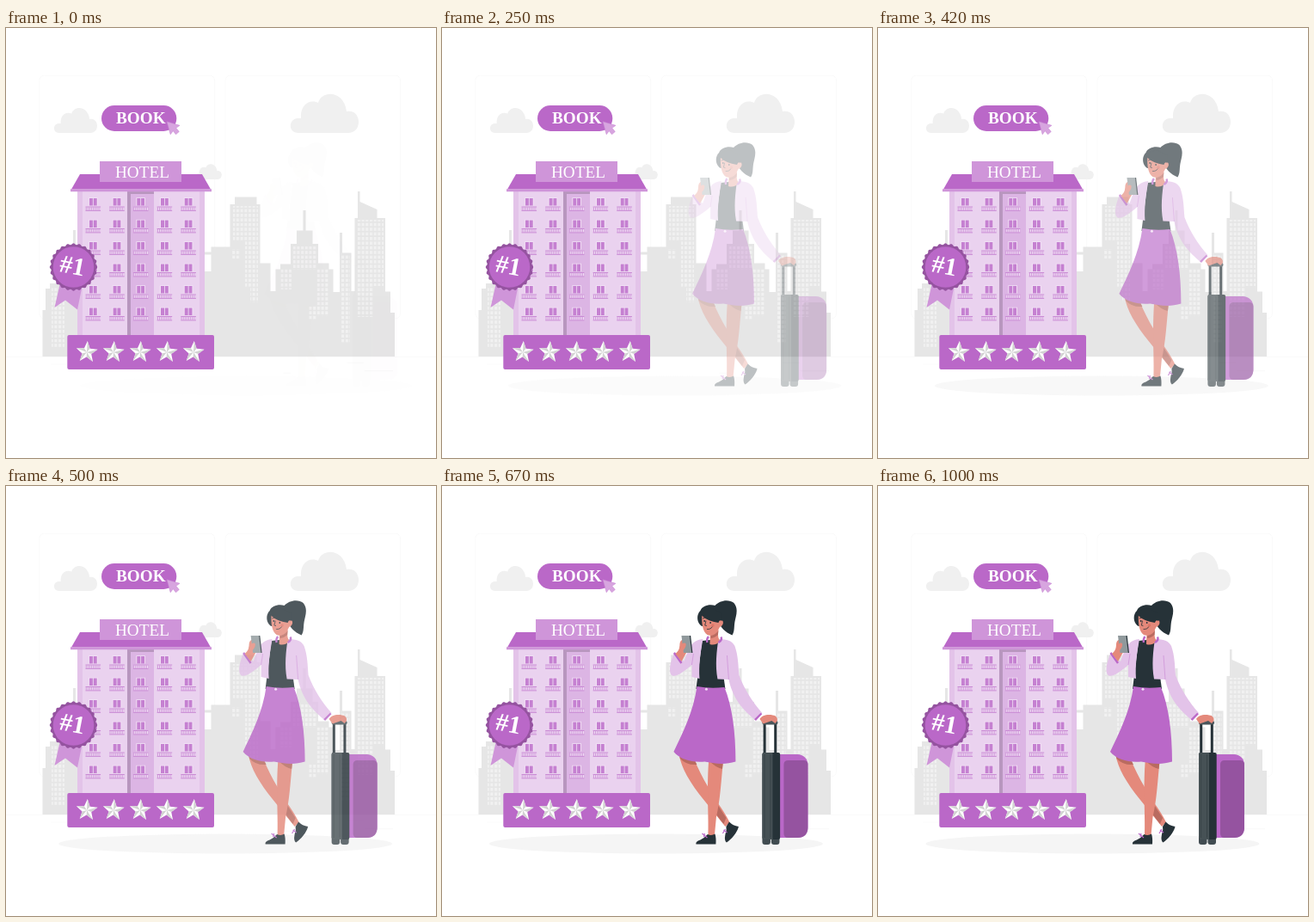
These frames come from a looping animation (500x500 px, 1.04 s). An HTML page:

```html
<!DOCTYPE html>
<html lang="en">
<head>
<meta charset="utf-8">
<title>Hotel booking</title>
<style>
  html, body { margin: 0; width: 100%; height: 100%; overflow: hidden; background: #fff }
  svg { display: block; width: 100vw; height: 100vh }
  text { font-family: "Liberation Serif", serif; fill: #fff }
  .main { fill: #ba68c8 }
  .mid { fill: #cf95d9 }
  .pale { fill: #e3c3e9 }
  .deep { fill: #9553a0 }
  .dark { fill: #263238 }
  .skin { fill: #e4897b }
  .shade { fill: #b96b60 }
  .line { fill: none; stroke: #ba68c8; stroke-width: 2.4 }
  .ink { fill: none; stroke: #263238; stroke-width: .8; stroke-linecap: round }
</style>
</head>
<body>
<svg viewBox="0 0 500 500">
  <defs>
    <path id="cloud" d="M9 46C-3 46-3 30 8 29Q10 29 12 29C11 15 20 6 32 11C36-4 62-4 65 21C74 19 79 26 79 33C79 41 74 46 67 46Z"/>
    <pattern id="dots" width="4.7" height="5.4" patternUnits="userSpaceOnUse">
      <rect width="3" height="3.6" fill="#f1f1f1"/>
    </pattern>
    <g id="window">
      <path fill="#f3e5f6" d="M-5.3-.7H5.3V8.5H-5.3Z"/>
      <path fill="#c580d1" d="M-4.4 0H-.4V8.5H-4.4ZM.4 0H4.4V8.5H.4Z"/>
      <path fill="#f0dff4" d="M-8.5 9.5H8.5V14.5H-8.5Z"/>
      <path fill="none" stroke="#c98ad4" d="M-8.8 10H8.8M-8.8 14.4H8.8"/>
      <path fill="none" stroke="#cf95d9" stroke-width="4" stroke-dasharray="1 1.1" d="M-8.5 12.3H8.6"/>
    </g>
  </defs>

  <g fill="none" stroke="#ebebeb" stroke-width=".25">
    <rect x="38.8" y="55.2" width="203.8" height="282.6" rx="5.7"/>
    <rect x="255" y="55.2" width="203.6" height="282.6" rx="5.7"/>
    <path d="M0 382.5H500M416.8 398.6H450M322.5 401.3H331M396.6 389.3H415.8M52.5 391H95M131 395H225"/>
  </g>
  <g fill="#f0f0f0">
    <use href="#cloud" x="331" y="76"/>
    <use href="#cloud" transform="translate(56 92.5) scale(.633 .64)"/>
    <use href="#cloud" transform="translate(220 158) scale(.39)"/>
  </g>
  <path fill="#e6e6e6" d="M42.500 382V328H46V303H51V297H78V235H81V297H230V283H238.500V263.500H230V260.500H238.500V254.500H260.500V205H266V196.500H291.500V205H295.500V273.500H307.500V306H313.500V280.500H319V274.500H331V251H338V235.500H345.500V212H348.500V235.500H356.500V251H363V273.500H375.500V280.500H380.500V307H388V238H391V261.500H401.500V306H405.500V221H409V190H411.500V202L431.500 211V221H441V306.500H447V331H452V382Z"/>
  <path fill="url(#dots)" d="M53 302H68V372H53ZM264 207H293V247H264ZM278 247H293V302H278ZM263 257H272V268H263ZM284 302H293V319H284ZM334 254H362V281H334ZM319 279H332V304H319ZM361 279H375V335H361ZM352 324H362V340H352ZM390 264H400V367H390ZM408 223H439V300H408ZM408 300H427V336H408Z"/>

  <g id="hotel">
    <path class="pale" d="M83 189H231V358H83Z"/>
    <path fill="#ead2ef" d="M89 190H225V358H89Z"/>
    <path fill="#dcb5e4" d="M141 190H172V358H141Z"/>
    <path fill="#b896be" d="M141 190H172V193H145V358H141Z"/>
    <g id="windows"></g>
    <path class="main" d="M86 170H228L238 187.500H76Z"/>
    <path class="mid" d="M75 187.300H239V190.200H75ZM109 155H204V179H109Z"/>
    <text x="127" y="174" font-size="19.2">HOTEL</text>
    <rect class="main" x="71.300" y="357" width="170.700" height="40" rx="2"/>
    <g id="stars"></g>
  </g>

  <path class="mid" d="M63 296L56.500 325L69 316.500L83 327.500L88 303Z"/>
  <path id="seal" class="deep"/>
  <circle class="main" cx="78.500" cy="278" r="23.800"/>
  <text transform="translate(61 283) rotate(11)" font-size="29.500" font-weight="bold">#1</text>

  <rect class="main" x="111" y="90" width="87.300" height="30" rx="15"/>
  <text x="128" y="110.700" font-size="19.200" font-weight="bold">BOOK</text>
  <path fill="#d7a5df" stroke="#c580d1" stroke-width=".5" d="M187 108.800L202 113.300L197.800 116.300L201.300 120.500L197.500 123.800L194.300 119.700L191.200 123.800Z"/>

  <g id="traveller">
    <ellipse cx="249.500" cy="416" rx="194" ry="11.500" fill="#f5f5f5"/>

    <rect class="main" x="380" y="312" width="46" height="97" rx="12"/>
    <path class="deep" d="M403 319H421Q426 319 426 324V397Q426 409 414 409H403Q398 409 398 404V324Q398 319 403 319Z"/>
    <path fill="none" stroke="#263238" stroke-width="3" d="M375.700 311V276M388.300 311V276"/>
    <rect x="373" y="273" width="18" height="4.500" rx="2" fill="#4a565b"/>
    <rect x="373" y="408" width="9.500" height="9" rx="3" fill="#414c51"/>
    <rect x="383.500" y="408" width="9.500" height="9" rx="3" fill="#414c51"/>
    <rect class="dark" x="373" y="310" width="20.700" height="101" rx="2"/>
    <path fill="#465155" d="M375 310H385V411H375Q373 411 373 409V312Q373 310 375 310Z"/>
    <path fill="none" stroke="#384347" d="M375.500 312V409M382.500 312V409"/>

    <path class="skin" d="M276 311C279 329 289 345 305 365L330 396L335 391C326 373 316 363 310 350C304 340 298 328 293 316Z"/>
    <path class="shade" d="M276 311L293 316L297 324Q285 325 277.500 317ZM320 369L331 386L328 393L318 380Z"/>
    <path class="skin" d="M311 316L327.500 320C325 345 324 366 319.500 385L317.500 406H310C311 385 308 350 311 316Z"/>
    <path class="shade" d="M311 316L327.500 320L326.500 329Q318 327 311 319Z"/>
    <path class="dark" d="M309.500 405Q314 407 318 404.500Q319.500 409 319 416.500H296Q295 413.500 301 411.500Q306 409 309.500 405Z"/>
    <path class="dark" d="M334.500 390.500Q339 395 345.500 396C344 403 337 411 331.500 414.500Q328.500 413 330 405Q332 400 331 396Z"/>
    <path class="line" style="stroke-width:1.200" d="M303 404L309 409M306 404L305 408M328 400L332 403M330 399L327 404"/>

    <path class="dark" d="M303 180L322 178L330 236H296Z"/>
    <path class="main" d="M297 233Q312 236 329 234C338 256 342 286 342 320.500C328 325 315 322 306 320.500C292 322 277 318 270 309C281 286 293 262 297 233Z"/>
    <circle cx="308" cy="236.300" r="1.500" fill="#f0d9f4"/>

    <path class="pale" d="M304 178C294 179 290 184 286 193L282 204L271 193C266 204 264 215 267 219.500C271 224 282 216 291 208L291 222L300 224C299 208 301 194 304 178Z"/>
    <path class="pale" d="M322 178C332 178 338 180 341 186C345 197 345 208 346 220C352 236 362 252 373 264L366 273C351 261 339 248 334 225L321 224.500C318 208 320 192 322 178Z"/>
    <path fill="none" stroke="#cf95d9" stroke-width=".8" d="M291 208L293 195M334 225L332 197"/>
    <path class="line" d="M270.500 194L279 206M364.500 272L372 264.500"/>

    <path class="skin" d="M272 195C276 192 277 188 277 184Q277 180 281 178L285 181L286 192C283 196 281 201 279 204Z"/>
    <path fill="#263238" d="M282 174H289.700L292 194H285Z"/>
    <path fill="#90999c" d="M279 174H288.500L290.800 194H281.500Z"/>
    <path class="skin" d="M277 187Q281 181 284 183Q285 187 281 191L277 194ZM370 271C372 267 379 265 385 266.500Q391 267 390.500 273L388 276L384 273L374 276.500Z"/>

    <path class="skin" d="M313 168L322 167C321 174 322 178 324 180Q319 186 312 184Q312 178 313 168Z"/>
    <path class="shade" d="M313 174Q319 173 322 168L321.500 173Q317 177 313 177Z"/>
    <path class="line" d="M310.500 175Q308 178 309 182M322 182Q327 179 325 175.500"/>
    <path class="dark" d="M303 163C298 161 295 151 301 145C303 139 312 137 318 139C323 133 334 131 340 136C346 143 342 152 341 158C340 164 341 169 338 173.500C330 170 323 164 323 157Z"/>
    <path class="skin" d="M303 149C302 160 304 170 309 173C315 176 321 170 323.500 164C328 163 329 156 325 156L318 150Z"/>
    <path class="dark" d="M300 148Q307 142 316 143L326 148L326 157Q323 155 322 159Q309 157 303 151Z"/>
    <path class="ink" d="M304 154L306 153.300M311 155.300L314.500 156.300M309 166.500Q313 167 315 163.500M307.500 157L306.300 162L308 162.500"/>
    <circle class="dark" cx="305.700" cy="157" r=".9"/>
    <circle class="dark" cx="312.700" cy="159" r=".9"/>
    <circle cx="315.500" cy="162" r="1.700" fill="#dc7567"/>
  </g>
</svg>

<script>
const $ = id => document.getElementById(id);
const polar = (r, a) => [r * Math.cos(a), r * Math.sin(a)].map(v => v.toFixed(2)).join(' ');

let windows = '';
for (let row = 0; row < 6; row++)
  for (let col = 0; col < 5; col++)
    windows += `<use href="#window" x="${101.3 + col * 27.7}" y="${198 + row * 25.5}"/>`;
$('windows').innerHTML = windows;

// Each star is a white outline with one grey facet per arm.
let outline = '', facets = '';
for (let i = 0; i < 5; i++) {
  const a = -Math.PI / 2 + .06 + i * Math.PI * .4;
  const tip = polar(13, a), notch = polar(5.6, a + Math.PI / 5);
  outline += `${i ? 'L' : 'M'}${tip}L${notch}`;
  facets += `M0 0L${tip}L${notch}Z`;
}
let stars = '';
for (let i = 0; i < 5; i++)
  stars += `<g transform="translate(${94 + i * 31} 377)"><path fill="#fff" d="${outline}Z"/><path fill="#d2d2d2" d="${facets}"/></g>`;
$('stars').innerHTML = stars;

let edge = '';
for (let i = 0; i < 144; i++)
  edge += (i ? 'L' : 'M') + polar(26.9 + .9 * Math.cos(i * Math.PI / 3), i * Math.PI / 72);
$('seal').setAttribute('d', edge + 'Z');
$('seal').setAttribute('transform', 'translate(78.5 278)');

const bezier = (a, b, s) => 3 * a * s * (1 - s) ** 2 + 3 * b * s * s * (1 - s) + s ** 3;

// Eases in and overshoots before settling.
function ease(x) {
  let lo = 0, hi = 1;
  for (let i = 0; i < 24; i++) {
    const s = (lo + hi) / 2;
    if (bezier(.36, .5, s) < x) lo = s; else hi = s;
  }
  return bezier(-.01, 1.38, hi);
}

const LOOP = 1040, FPS = 24;

function draw(now) {
  const step = Math.floor((now % LOOP + 4) * FPS / 1000);
  const y = ease(Math.min(1, (step + .9) / FPS));
  $('traveller').setAttribute('transform', `translate(${30 * (1 - y)} 0)`);
  $('traveller').setAttribute('opacity', Math.max(0, Math.min(1, y)));
  requestAnimationFrame(() => draw(performance.now() - start));
}
const start = performance.now();
draw(0);
</script>
</body>
</html>
```
